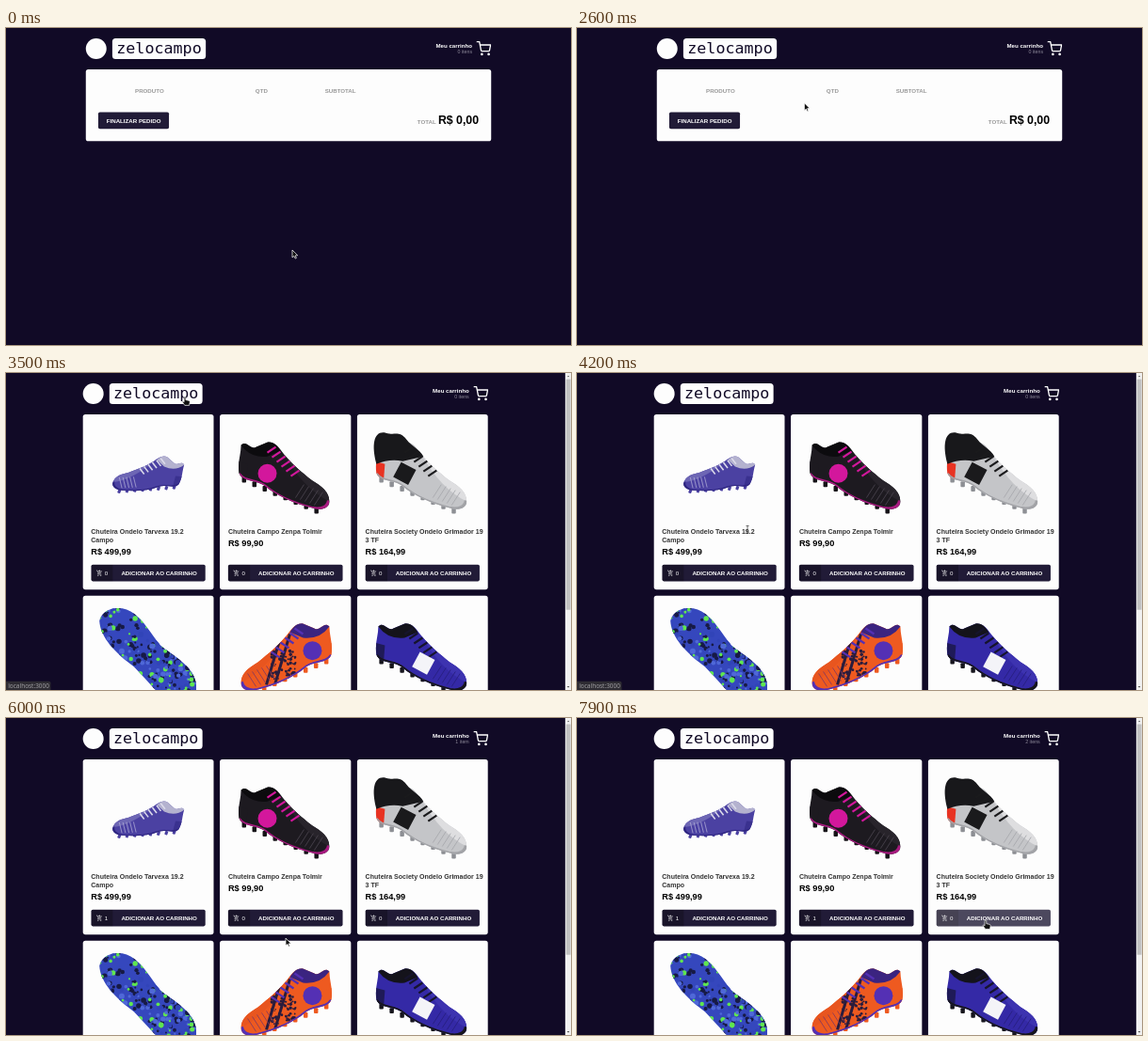
Write an HTML page that moves like this. It is 600 by 337 pixels and loops after 8 s.

```html
<!DOCTYPE html>
<html lang="pt-BR">
<head>
<meta charset="utf-8">
<title>Loja de chuteiras</title>
<style>
* { box-sizing: border-box; margin: 0; padding: 0; }
html, body { width: 100%; height: 100%; overflow: hidden; background: #110a26; }
#stage {
  position: absolute; left: 0; top: 0; width: 1366px; height: 768px; overflow: hidden;
  transform: scale(.43924); transform-origin: 0 0;
  font: 14px "Liberation Sans", Arial, sans-serif; color: #fff;
}
#page { width: 1366px; }
.scroll #page { width: 1351px; }
.wrap { width: 980px; margin: 0 auto; }

header { height: 100px; display: flex; justify-content: space-between; align-items: center; }
.brand, .bag { display: flex; align-items: center; }
.mark { width: 50px; height: 50px; border-radius: 50%; background: #fdfdfd; margin-right: 14px; }
.name {
  height: 50px; line-height: 49px; padding: 0 10px; border-radius: 8px;
  background: #fdfdfd; color: #110a26;
  font-family: "DejaVu Sans Mono", monospace; font-size: 38px;
}
.bag div { text-align: right; margin-right: 10px; }
.bag strong, .bag span { display: block; }
.bag span { font-size: 12px; color: #8c8898; }

.card { background: #fdfdfd; border-radius: 6px; }
#cart { position: relative; height: 174px; }
#cart > * { position: absolute; }
#cart b { top: 44px; color: #999; }
.order { left: 30px; top: 104px; padding: 12px 20px; border-radius: 4px; background: #211b37; font-weight: bold; }
.total { right: 30px; top: 108px; display: flex; align-items: baseline; color: #999; font-weight: bold; }
.total strong { font-size: 28px; margin-left: 5px; color: #000; }

#list { display: grid; grid-template-columns: repeat(3, minmax(0, 1fr)); gap: 15px; }
#list .card { display: flex; flex-direction: column; padding: 20px; }
.photo { display: none; width: 250px; height: 250px; align-self: center; }
.scroll .photo { display: block; }
.title { font-size: 16px; line-height: 20px; margin-top: 5px; color: #333; white-space: pre; }
.price { font-size: 21px; line-height: 24px; font-weight: bold; margin: 5px 0 20px; color: #000; }
.add { display: flex; height: 40px; margin-top: auto; border-radius: 4px; overflow: hidden; background: #211b37; line-height: 40px; }
.add.on { opacity: .8; }
.add div { display: flex; align-items: center; padding: 0 12px; background: rgba(0, 0, 0, .25); }
.add svg { margin-right: 5px; }
.add strong { flex: 1; text-align: center; }

#bar { display: none; position: absolute; right: 0; top: 0; width: 14px; height: 768px; background: #f1f1f1; }
.scroll #bar { display: block; }
#bar i { position: absolute; left: 4px; width: 7px; height: 4px; background: #505050; clip-path: polygon(50% 0, 100% 100%, 0 100%); }
#bar i:first-child { top: 6px; }
#bar i:last-child { top: 758px; transform: scaleY(-1); }
#bar u { position: absolute; left: 2px; top: 15px; width: 11px; height: 558px; background: #c1c1c1; }
#status {
  position: absolute; left: 0; bottom: 0; height: 22px; line-height: 21px; padding: 0 3px 0 5px;
  border-radius: 0 4px 0 0; background: #2e2c33; color: #a09fa3;
  font-family: "Noto Sans", sans-serif; font-size: 14.7px;
}
[hidden] { display: none !important; }
#pointer { position: absolute; left: 0; top: 0; width: 600px; height: 337px; pointer-events: none; }
</style>
</head>
<body>
<div id="stage">
  <div id="page">
    <header class="wrap">
      <div class="brand"><div class="mark"></div><div class="name">zelocampo</div></div>
      <div class="bag">
        <div><strong>Meu carrinho</strong><span id="items"></span></div>
        <svg width="36" height="36" viewBox="0 0 24 24" fill="none" stroke="#fff" stroke-width="2" stroke-linecap="round" stroke-linejoin="round">
          <circle cx="9" cy="21" r="1"/><circle cx="20" cy="21" r="1"/>
          <path d="M1 1h4l2.7 13.4a2 2 0 0 0 2 1.6h9.7a2 2 0 0 0 2-1.6L23 6H6"/>
        </svg>
      </div>
    </header>
    <div id="cart" class="wrap card">
      <b style="left:119px">PRODUTO</b><b style="left:410px">QTD</b><b style="left:578px">SUBTOTAL</b>
      <div class="order">FINALIZAR PEDIDO</div>
      <div class="total">TOTAL<strong>R$ 0,00</strong></div>
    </div>
    <div id="list" class="wrap"></div>
  </div>
  <div id="bar"><i></i><u></u><i></i></div>
  <div id="status">localhost:3000</div>
</div>
<svg id="pointer" viewBox="0 0 600 337">
  <clipPath id="upper"><path id="shell" d="M8 24C14 18 18 30 24 26L36 21C44 20 48 26 54 34 64 46 72 52 84 62 94 68 102 74 102 84 102 92 92 94 84 91 64 86 46 78 34 68 24 60 10 64 6 54 4 42 8 34 8 24Z"/></clipPath>
  <clipPath id="tread"><path id="sole" d="M3 18C6 6 20 2 32 6 48 12 56 30 68 44 82 56 104 66 106 86V110H78C62 90 52 80 40 67 20 52 4 36 3 18Z"/></clipPath>
  <g id="cursor" fill="#111" stroke="#fff" stroke-width=".7" stroke-linejoin="round">
    <path id="arrow" d="M0 0V8L1.9 6.4 3.2 9.1 4.4 8.5 3.2 5.9 5.7 5.8Z"/>
    <path id="hand" d="M-.9.9C-.9-.4.9-.4.9.9V3.6L4 4.3C5.2 4.6 5.4 5.4 5.2 6.4L4.6 9.4H-.2C-1 8-2.4 6.6-2.8 5.6-2.6 4.6-1.6 5-.9 5.8Z"/>
    <path id="beam" d="M-1.5-4H1.5M0-4V4M-1.5 4H1.5" stroke="#333"/>
  </g>
</svg>
<script>
const $ = id => document.getElementById(id);

let seed = 7;
const rnd = n => (seed = seed * 16807 % 2147483647) / 2147483647 * n;
const many = (n, fn) => Array.from({ length: n }, (_, i) => fn(i)).join('');
const fill = (d, color) => `<path d="${d}" fill="${color}"/>`;
const line = (d, color, w) => `<path d="${d}" fill="none" stroke="${color}" stroke-width="${w}"/>`;
const photo = body => `<svg class="photo" viewBox="0 0 110 110">${body}</svg>`;

// One silhouette, toe to the lower right, dressed in different colours
function boot(o) {
  const pose = `translate(55 55) rotate(${o.turn || 0}) scale(${o.flip ? -1 : 1} 1) scale(${o.size || 1}) translate(-55 -55)`;
  const bx = o.badgeX || 36, by = 38 + .45 * bx;
  const badge = !o.badge ? '' : o.square
    ? `<path d="M-9-9H9V9H-9Z" fill="${o.badge}" transform="translate(${bx} ${by}) rotate(28)"/>`
    : `<circle cx="${bx}" cy="${by}" r="10" fill="${o.badge}"/>`;
  return photo(`<g transform="${pose}">
    ${many(8, i => `<rect x="${9 + i * 11}" y="${58 + i * 4.7}" width="4.5" height="6" rx="1" fill="${o.stud}"/>`)}
    <use href="#shell" fill="${o.body}"/>
    <g clip-path="url(#upper)">
      ${fill('M54 34L102 66V84Q74 70 54 34Z', o.toe)}
      ${fill('M0 40L15 44 13 70H0Z', o.heel || o.body)}
      ${o.speckle ? many(70, i => `<circle cx="${44 + rnd(26)}" cy="${50 + rnd(32)}" r="${.6 + rnd(1.2)}" fill="${o.speckle}"/>`) +
        many(2, i => line(`M${50 + i * 9} 32L${66 + i * 9} 86`, o.speckle, 3)) : ''}
      ${many(5, i => line(`M${66 + i * 5} ${80 + i * 2}l9-14`, o.crease, .9))}
      ${line('M5 55C12 65 24 61 34 69 46 79 64 87 84 92 94 94 101 90 102 83', o.sole, 5)}
    </g>
    ${fill(o.sock ? 'M6 44C0 22 4 8 16 11 26 14 30 8 38 18 44 26 52 28 56 36L34 41Q20 38 6 44Z'
      : 'M8 24C14 18 18 30 24 26L36 21C42 20 46 24 50 30L36 36Q18 38 8 24Z', o.collar)}
    ${many(6, i => line(`M${45 + i * 5} ${26 + i * 5}l-9 6`, o.lace, 2.2))}
    ${badge}</g>`);
}

const camo = ['#5fe650', '#171a45', '#3144b8', '#171a45', '#4f68d8'];
const sole = () => photo(`<use href="#sole" fill="#3547bd"/><g clip-path="url(#tread)">${many(420, i =>
  `<circle cx="${rnd(110)}" cy="${rnd(110)}" r="${1 + rnd(2)}" fill="${camo[i % camo.length]}"/>`)}</g>`);

const products = [
  ['Chuteira Ondelo Tarvexa 19.2\nCampo', '499,99', boot({ flip: true, turn: 19, size: .7, body: '#4b41a2', toe: '#6d66b4', heel: '#3a318f',
    sole: '#2f2680', stud: '#4b41a2', crease: '#b9b6dc', collar: '#b4b2cf', lace: '#dcdbea' })],
  ['Chuteira Campo Zenpa Tolmir', '99,90', boot({ body: '#1d1a20', toe: '#28242b', sole: '#a81a80', stud: '#151217',
    crease: '#48424c', collar: '#0c0b0e', lace: '#d3179c', badge: '#d3179c' })],
  ['Chuteira Society Ondelo Grimador 19\n3 TF', '164,99', boot({ sock: true, square: true, body: '#c4c5c8', toe: '#dedee0', heel: '#e83322',
    sole: '#a2a3a7', stud: '#8d8f94', crease: '#a9aaae', collar: '#18181b', lace: '#1a1a1c', badge: '#1a1a1c' })],
  ['Chuteira Futsal Bralnor QX Tirso\nVIII', '124,67', sole()],
  ['Chuteira Vondar Campo Marluza', '65,99', boot({ flip: true, body: '#ee5a20', toe: '#e8551f', sole: '#5430b4', stud: '#ee5a20',
    crease: '#8a3a5a', collar: '#3b2480', lace: '#5430b4', speckle: '#2a1c3c', badge: '#5430b4', badgeX: 26 })],
  ['Chuteira Society Ondelo Z 19 4 TF', '159,99', boot({ square: true, body: '#3429a6', toe: '#3d33b0', heel: '#1f1a58', sole: '#16151d', stud: '#16151d',
    crease: '#282080', collar: '#14131b', lace: '#16142c', badge: '#f4f4f8', badgeX: 56 })]
];

const addIcon = `<svg width="16" height="16" viewBox="0 0 24 24" fill="none" stroke="#fff" stroke-width="2">
  <path d="M12 1v8M8 5h8M1 3h2.6l4.3 9-1.5 2.7c-.6 1 .1 2.3 1.2 2.3H19M8 12h7.6l4-7.4"/>
  <circle cx="7" cy="21" r="1"/><circle cx="17" cy="21" r="1"/></svg>`;

$('list').innerHTML = products.map(([title, price, picture]) => `<div class="card">${picture}
  <strong class="title">${title}</strong><span class="price">R$ ${price}</span>
  <div class="add"><div>${addIcon}<span class="qty">0</span></div><strong>ADICIONAR AO CARRINHO</strong></div></div>`).join('');

const buttons = [...document.querySelectorAll('.add')];
const counts = [...document.querySelectorAll('.qty')];

const LOOP = 8000, TICK = 100;
const LINK_SHOWN = 3300, LIST_OPEN = 3400, PHOTOS_IN = 3500, LINK_GONE = 4400;
const CLICKS = [5200, 6600], BUSY = 400;

// Pointer moves; bow above 1 lets x lag behind y
const home = { x: 304, y: 236 };
const moves = [
  { from: 1400, to: 3200, x: 190, y: 25, bow: 2 },
  { from: 3800, to: 4400, x: 168, y: 216, bow: 3 },
  { from: 5300, to: 6000, x: 297, y: 234, bow: 1 },
  { from: 6000, to: 6600, x: 314, y: 217, bow: 1 },
  { from: 6700, to: 8000, x: 437, y: 215, bow: 1.5 }
];

function pointerAt(t) {
  let { x, y } = home;
  for (const m of moves) {
    const k = Math.min(1, Math.max(0, (t - m.from) / (m.to - m.from)));
    const s = k * k * (3 - 2 * k);
    x += (m.x - x) * s ** m.bow;
    y += (m.y - y) * s;
  }
  return [x, y];
}

function render(t) {
  const qty = CLICKS.map(c => t >= c ? 1 : 0);
  const sum = qty[0] + qty[1];
  $('cart').hidden = t >= LIST_OPEN;
  $('list').hidden = t < LIST_OPEN;
  $('status').hidden = t < LINK_SHOWN || t >= LINK_GONE;
  $('stage').className = t >= PHOTOS_IN ? 'scroll' : '';
  $('items').textContent = sum + (sum === 1 ? ' item' : ' itens');
  counts.forEach((c, i) => c.textContent = qty[i] || 0);

  const [x, y] = pointerAt(t);
  const under = document.elementFromPoint(x, y);
  const over = css => under && under.closest(css);
  const busy = CLICKS.some(c => t >= c && t < c + BUSY);
  const shape = busy ? 'arrow' : over('.name, .add') ? 'hand' : over('.title') ? 'beam' : 'arrow';
  buttons.forEach(b => b.classList.toggle('on', b === over('.add')));
  for (const id of ['arrow', 'hand', 'beam']) $(id).style.display = id === shape ? '' : 'none';
  $('cursor').setAttribute('transform', `translate(${x} ${y})`);
}

const start = performance.now();
let last = -1;
function frame() {
  const t = Math.floor((performance.now() - start) % LOOP / TICK) * TICK;
  if (t !== last) render(last = t);
  requestAnimationFrame(frame);
}
frame();
</script>
</body>
</html>
```
